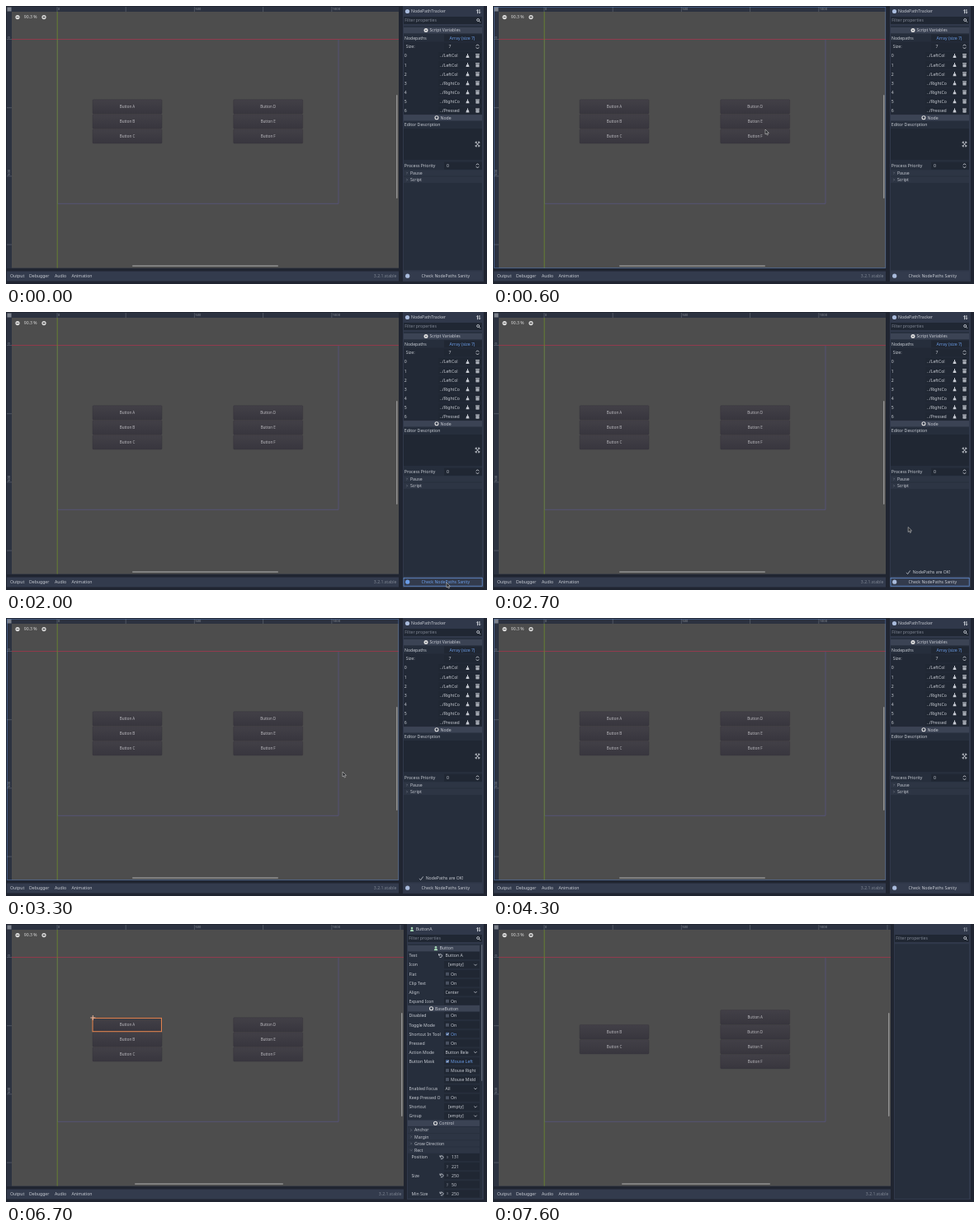
Animation, 583 px wide and 338 px high, one loop 8000 ms. Source, as an HTML page:

```html
<!DOCTYPE html>
<html lang="en">
<head>
<meta charset="utf-8">
<title>Node path check</title>
<style>
  html, body { margin: 0; width: 100%; height: 100%; overflow: hidden; background: #202531; }
  svg { display: block; width: 100%; height: 100%; }
  text { font-family: "Noto Sans", sans-serif; white-space: pre; }
</style>
</head>
<body>
<svg id="stage" viewBox="0 0 583 338"></svg>
<script>
const LOOP = 8000;
const INK = '#c6cad2', DIM = '#7e8592', BLUE = '#6a9ce6', FIELD = '#202733', BAR = '#333b4d';

// Drawing helpers; text is placed by its vertical middle.
const rect = (x, y, w, h, fill, more = '') =>
  `<rect x="${x}" y="${y}" width="${w}" height="${h}" fill="${fill}" ${more}/>`;
const line = (d, color = INK, width = 0.8, more = '') =>
  `<path d="${d}" fill="none" stroke="${color}" stroke-width="${width}" ${more}/>`;
const dot = (x, y, r, fill, more = '') => `<circle cx="${x}" cy="${y}" r="${r}" fill="${fill}" ${more}/>`;
const text = (x, y, str, fill = INK, size = 5.17, more = '') =>
  `<text x="${x}" y="${y + size * 0.36}" font-size="${size}" fill="${fill}" ${more}>${str}</text>`;
const MIDDLE = 'text-anchor="middle"';

// Small icons
const chevron = (x, y) => line(`M${x - 1.7} ${y - 0.8}l1.7 1.7 1.7-1.7`);
const spinner = (x, y) => line(`M${x - 1.7} ${y - 0.9}l1.7-1.7 1.7 1.7M${x - 1.7} ${y + 0.9}l1.7 1.7 1.7-1.7`, INK, 1);
const broom = (x, y) => rect(x - 0.5, y - 2.6, 1, 2.4, INK) +
  `<path d="M${x - 1.4} ${y - 0.4}h2.8l.6 2.8h-4z" fill="${INK}"/>`;
const trash = (x, y) => rect(x - 2.4, y - 2.5, 4.8, 1.2, INK) + rect(x - 2, y - 0.8, 4, 3.4, INK) +
  line(`M${x - 0.6} ${y - 0.5}v2.5m1.2-2.5v2.5`, '#4b5261', 0.4);
const revert = (x, y) => line(`M${x - 1.6} ${y - 0.8}a1.9 1.9 0 1 1 .5 2.4M${x - 2} ${y - 2.3}v1.9h1.8`, INK, 0.9);
const person = (x, y) => dot(x, y - 1.4, 1.3, '#a5d8b4') +
  `<path d="M${x - 2.2} ${y + 2.6}a2.2 2.6 0 0 1 4.4 0z" fill="#a5d8b4"/>`;
const ring = (x, y) => dot(x, y, 2, 'none', 'stroke="#e0e0e0" stroke-width="1.1"');
const sorter = (x, y, color) =>
  line(`M${x - 1.2} ${y + 2.6}v-4.8l-1.2 1.2m1.2-1.2l1 1M${x + 1.2} ${y - 2.6}v4.8l-1-1.2m1 1.2l1.2-1.2`, color, 1);
const checkbox = (x, y, on) => rect(x - 2, y - 2, 4, 4, on ? '#46618d' : '#4a5262', 'rx=".5"') +
  (on ? line(`M${x - 1.2} ${y}l1 1.1 1.7-2.2`, '#e8edf6', 0.8) : '');

function viewport(right, buttons) {
  const parts = [
    rect(1, 1, right - 1, 318, '#2c3240'),
    rect(7, 7, right - 7, 311.5, '#4d4d4d'),
    rect(1.5, 1.5, 5, 5, '#7d828c')
  ];
  for (let i = 0; i < 6; i++) {
    const x = 62 + i * 83.2, y = 40.5 + i * 83.2;
    if (x < right) parts.push(line(`M${x} 1v6`, '#676c77', 0.6));
    if (y < 318) parts.push(line(`M1 ${y}h6`, '#676c77', 0.6));
    if (i % 2 === 0 && i < 5) parts.push(text(x + 1, 3.7, i * 250, '#8b9099', 4));
    if (i % 2 === 0 && i < 4)
      parts.push(text(3.7, y - 1, i * 250, '#8b9099', 4, `transform="rotate(-90 3.7 ${y - 1})"`));
  }
  parts.push(
    line('M62.5 40.5H403V240.3H62.5z', '#5e5ca0', 0.8, 'opacity=".6"'),
    line(`M7 40.5H${right}`, '#97384a', 0.9),
    line('M62.2 7V318.5', '#6a8632', 0.9),
    ...buttons.map(([name, x, y]) =>
      rect(x, y, 84, 17.4, 'url(#face)', 'rx="1.2" stroke="#35333a" stroke-width=".4"') +
      text(x + 42, y + 8.5, 'Button ' + name, '#bab9be', 4.5, MIDDLE)),
    dot(14, 13.6, 2.6, '#dedede'), line('M12.6 13.6h2.8', '#444', 0.8),
    text(21.8, 13.6, '90.3 %', '#d6d6d6'),
    dot(46, 13.6, 2.6, '#dedede'), line('M44.6 13.6h2.8m-1.4-1.4v2.8', '#444', 0.8)
  );
  const wide = right > 480;
  parts.push(
    rect(right - 3, 108, 1.5, 126, '#919191', 'rx=".7"'),
    rect(wide ? 156 : 153, 315.3, wide ? 180 : 177, 1.5, '#919191', 'rx=".7"'),
    rect(1, 322.5, right - 1, 12, BAR),
    ...[['Output', 5], ['Debugger', 28], ['Audio', 59], ['Animation', 79.5]].map(([s, x]) => text(x, 328.3, s)),
    text(right - 2.5, 328.3, '3.2.1.stable', DIM, 5.17, 'text-anchor="end"')
  );
  return parts.join('');
}

const dock = (left, sortColor) =>
  rect(left, 0, 579 - left, 335, '#30384a') +
  rect(left + 1, 13, 576 - left, 9, FIELD) +
  text(left + 2.3, 17.5, 'Filter properties', DIM) +
  dot(572.2, 17, 1.5, 'none', `stroke="${INK}" stroke-width=".9"`) + line('M573.3 18.1l1.7 1.7', INK, 0.9) +
  sorter(572.7, 6.6, sortColor) +
  rect(left + 1, 24.3, 576 - left, left > 483 ? 309.5 : 297, '#262e3c');

const category = (left, right, y, name, iconX, icon) =>
  rect(left + 1, y - 3.7, right - left - 1, 7.4, '#3b4354') + icon(iconX, y) + text(iconX + 4.5, y, name);

const fold = (left, right, y, name, open) =>
  rect(left + 1, y - 3.7, right - left - 1, 7.4, '#2d3544') +
  line(open ? `M${left + 4} ${y - 0.6}l1.2 1.2 1.2-1.2` : `M${left + 4.4} ${y - 1.2}l1.2 1.2-1.2 1.2`, DIM, 0.6) +
  text(left + 9, y, name);

const field = (y, right, str = '', x = 534) =>
  rect(531, y - 4.5, right - 531, 9, FIELD) + text(x, y, str);

function trackerDock() {
  const left = 481, right = 577;
  const paths = ['LeftCol', 'LeftCol', 'LeftCol', 'RightCo', 'RightCo', 'RightCo', 'Pressed'];
  const gear = (x, y) => dot(x, y, 2.5, '#e0e0e0') + dot(x, y, 0.8, '#3b4354');
  return dock(left, INK) +
    dot(486.5, 6.5, 2.6, '#a9bbdc') + text(491, 6.6, 'NodePathTracker') +
    category(left, right, 29.6, 'Script Variables', 509, gear) +
    text(483, 39.2, 'Nodepaths') + rect(531, 34.5, 46, 8.6, FIELD) +
    text(553, 38.7, 'Array (size 7)', BLUE, 5.17, MIDDLE) +
    rect(482, 43.5, 95, 88.5, '#222936') +
    text(484.7, 49.4, 'Size:') + field(49.4, right, '7', 536.5) + spinner(571.5, 49.4) +
    paths.map((p, i) => {
      const y = 60.6 + i * 11.07;
      return text(482.8, y, i) + rect(524, y - 4.5, 53, 9, FIELD) + text(526, y, '../' + p) +
        broom(559.5, y) + trash(571.5, y);
    }).join('') +
    category(left, right, 135.8, 'Node', 522, ring) +
    text(482.8, 144.3, 'Editor Description') + rect(482, 149, 95, 38, FIELD) +
    line('M569.2 167v-1.8h1.8m1 0h1.8v1.8m0 2v1.8h-1.8m-1 0h-1.8v-1.8M569.5 165.5l4 5m0-5l-4 5', INK, 0.9) +
    text(482.8, 194.3, 'Process Priority') + field(194.3, right, '0') + spinner(571.5, 194.3) +
    fold(left, right, 203, 'Pause') + fold(left, right, 211.3, 'Script') +
    rect(482, 323, 95, 10.5, BAR) + dot(486.7, 328.2, 2.6, '#a9bbdc', 'id="checkIcon"') +
    text(532.8, 328.2, 'Check NodePaths Sanity', INK, 5.17, MIDDLE + ' id="checkText"') +
    rect(482, 323.3, 95.2, 9.9, 'none', `stroke="${BLUE}" stroke-width=".7" id="buttonFocus"`) +
    `<g id="message">${line('M501 316.8l1.6 1.8 3-4.2', INK, 0.8)}${text(508.7, 316.5, 'NodePaths are OK!')}</g>`;
}

function buttonDock() {
  const left = 486, right = 574, step = 11.07;
  let y;
  const axis = (name, value) => field(y, right) + text(534, y, name, DIM, 4.4) + text(540, y, value);
  const controls = {
    box: (s, on) => field(y, right) + checkbox(535, y, on) + text(539, y, s, on ? BLUE : INK),
    list: s => field(y, right, s, s === '[empty]' ? 536 : 532.5) + chevron(569, y),
    text: s => revert(526.5, y) + field(y, right, s, 532.5),
    x: s => revert(528, y) + axis('x', s),
    y: s => axis('y', s)
  };
  const rows = (start, list, indent = 0) => list.map(([label, kind, value, on], i) => {
    y = start + i * step;
    return text(488.5 + indent, y, label) + controls[kind](value, on);
  }).join('');
  return dock(left, INK) + person(492, 6.5) + text(496.7, 6.6, 'ButtonA') +
    rect(576, 25, 1.4, 166, '#5d6574', 'rx=".7"') +
    category(left, right, 29.6, 'Button', 521, person) +
    rows(38.5, [['Text', 'text', 'Button A'], ['Icon', 'list', '[empty]'], ['Flat', 'box', 'On'],
      ['Clip Text', 'box', 'On'], ['Align', 'list', 'Center'], ['Expand Icon', 'box', 'On']]) +
    category(left, right, 102.7, 'BaseButton', 515.5, ring) +
    rows(111.6, [['Disabled', 'box', 'On'], ['Toggle Mode', 'box', 'On'], ['Shortcut In Tool', 'box', 'On', true],
      ['Pressed', 'box', 'On'], ['Action Mode', 'list', 'Button Rele'], ['Button Mask', 'box', 'Mouse Left', true],
      ['', 'box', 'Mouse Right'], ['', 'box', 'Mouse Midd'], ['Enabled Focus', 'list', 'All'],
      ['Keep Pressed O', 'box', 'On'], ['Shortcut', 'list', '[empty]'], ['Group', 'list', '[empty]']]) +
    category(left, right, 242.2, 'Control', 520.5, ring) +
    ['Anchor', 'Margin', 'Grow Direction', 'Rect'].map((s, i) =>
      fold(left, right, 250.6 + i * 8.15, s, s === 'Rect')).join('') +
    rows(283.6, [['Position', 'x', '131'], ['', 'y', '221'], ['Size', 'x', '250'], ['', 'y', '50'],
      ['Min Size', 'x', '250']], 3);
}

const column = (names, x, top) => [...names].map((name, i) => [name, x, top + i * 18]);
const before = [...column('ABC', 105, 113.7), ...column('DEF', 275.7, 113.7)];
const after = [...column('BC', 105, 122.6), ...column('ADEF', 275.7, 104.6)];
const selection = rect(105, 114.4, 83.5, 16.3, 'none', 'stroke="#e0834f" stroke-width="1.1"') +
  line('M102.3 114h6m-3-3v6', '#e8b59a', 1);

const stage = document.getElementById('stage');
stage.innerHTML = `<defs><linearGradient id="face" x2="0" y2="1">
    <stop stop-color="#424047"/><stop offset="1" stop-color="#38363e"/></linearGradient></defs>
  <g id="tracker">${viewport(476, before)}${trackerDock()}</g>
  <g id="selected">${viewport(482, before)}${selection}${buttonDock()}</g>
  <g id="moved">${viewport(482, after)}${dock(486, DIM)}</g>
  ${rect(1.4, 1.4, 474.4, 317.2, 'none', `stroke="${BLUE}" stroke-width=".7" opacity=".55" id="viewFocus"`)}
  <path id="cursor" d="M0 0V6L1.4 4.8 2.4 7 3.4 6.5 2.5 4.4H4.4Z" fill="#26282c" stroke="#c8c8c8" stroke-width=".6"/>`;

const el = id => document.getElementById(id);
const show = (id, on) => el(id).setAttribute('visibility', on ? 'visible' : 'hidden');

// Pointer path: time, x, y
const path = [[200, 20, 100], [600, 330, 150], [1000, 524, 213], [1300, 535, 303], [1500, 536, 325], [1700, 534, 329],
  [2200, 534, 329], [2800, 497, 248], [3000, 497, 248], [3300, 408, 187], [4300, 13, 68]];

function pointer(t) {
  const i = path.findIndex(p => p[0] > t);
  if (i < 1) return null;
  const [t0, x0, y0] = path[i - 1], [t1, x1, y1] = path[i], k = (t - t0) / (t1 - t0);
  return [x0 + (x1 - x0) * k, y0 + (y1 - y0) * k];
}

function draw(now) {
  const t = Math.floor((now % LOOP) / 100) * 100;
  const pos = pointer(t), pressed = t >= 2000 && t < 2200;
  const hover = pos && pos[0] > 481 && pos[1] > 322;
  const onButton = t >= 2000 && t < 3100;
  show('tracker', t < 6500);
  show('selected', t >= 6500 && t < 7600);
  show('moved', t >= 7600);
  show('buttonFocus', onButton);
  show('viewFocus', t >= 200 && t < 6500 && !onButton);
  show('message', t >= 2200 && t < 4300);
  el('message').setAttribute('opacity', Math.min(1, Math.max(0, (4300 - t) / 400)));
  el('checkText').setAttribute('fill', pressed ? BLUE : hover ? '#f2f4f8' : INK);
  el('checkIcon').setAttribute('fill', pressed ? BLUE : '#a9bbdc');
  show('cursor', pos);
  if (pos) el('cursor').setAttribute('transform', `translate(${pos[0]} ${pos[1]})`);
  requestAnimationFrame(draw);
}
requestAnimationFrame(draw);
</script>
</body>
</html>
```
